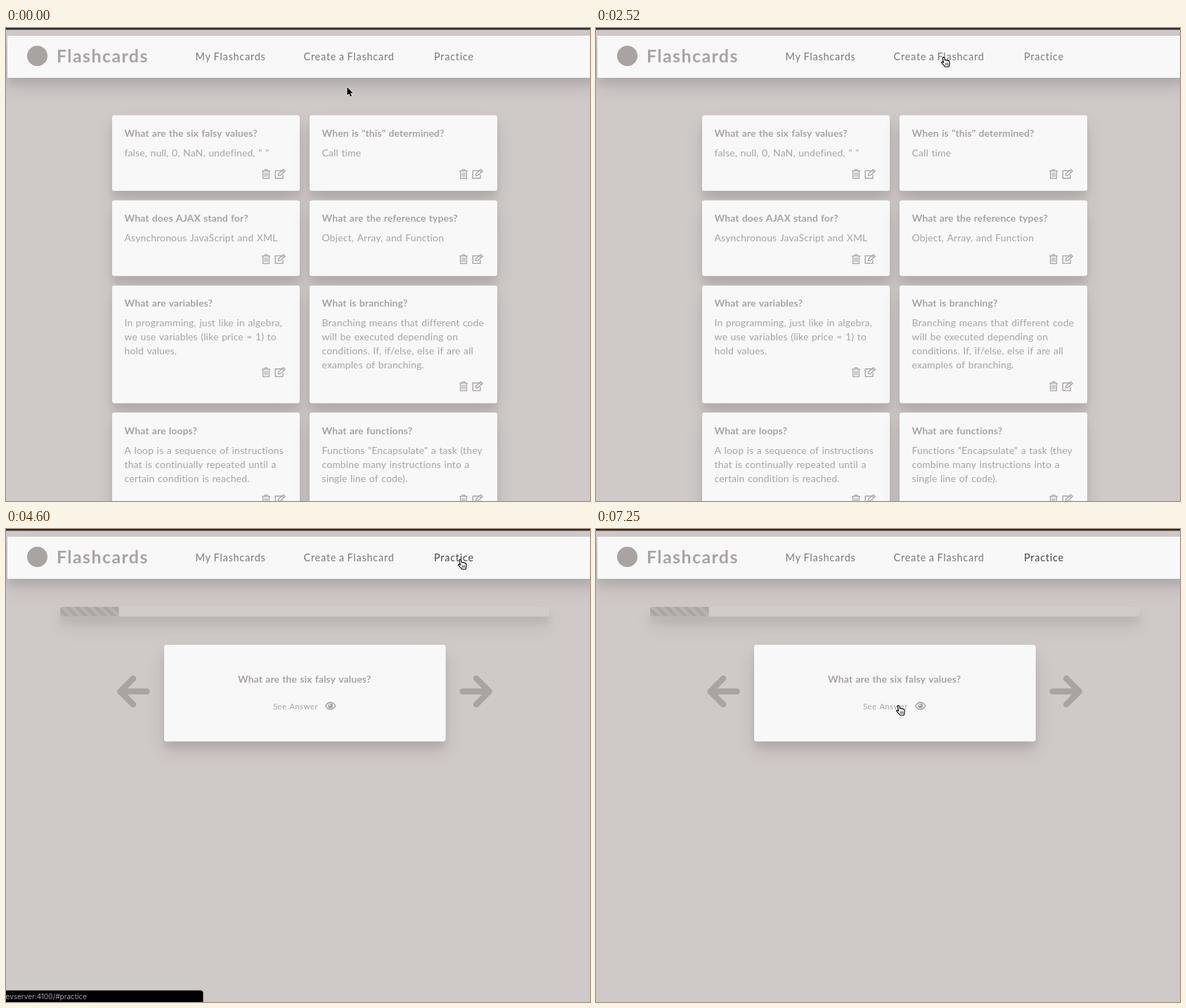
Animation, 831 px wide and 674 px high, one loop 8 s. Source, as an HTML page with a canvas:

```html
<!DOCTYPE html>
<html lang="en">
<head>
<meta charset="utf-8">
<title>Flashcards</title>
<style>
  html, body { margin: 0; width: 100%; height: 100%; overflow: hidden; background: #cfc9c8; }
  canvas { display: block; }
</style>
</head>
<body>
<canvas id="stage" width="831" height="674"></canvas>
<script>
const ctx = document.getElementById('stage').getContext('2d');
const LOOP = 8000;
const TICK = 148.2; // the screen refreshes once per tick
const INK = '#a9a3a2', PAPER = '#f8f8f8', PAGE = '#cfc9c8';

// Ticks at which the view changes
const HOVER = 20, STATUS = 24, PRACTICE = 31, FADE = 39;

// Pointer moves: start tick, end tick, destination
const HOME = [485, 84];
const MOVES = [
  [0, 2, 388, 88], [4, 5, 458, 88], [5, 11, 482, 41],
  [16, 17, 491, 41], [17, 19, 637, 64], [20, 22, 643, 43],
  [35, 39, 433, 180], [39, 43, 427, 244], [45, 49, 427, 251]
];

const DECK = [
  ['What are the six falsy values?', 'false, null, 0, NaN, undefined, " "'],
  ['When is "this" determined?', 'Call time'],
  ['What does AJAX stand for?', 'Asynchronous JavaScript and XML'],
  ['What are the reference types?', 'Object, Array, and Function'],
  ['What are variables?',
    'In programming, just like in algebra,\nwe use variables (like price = 1) to\nhold values.'],
  ['What is branching?',
    'Branching means that different code\nwill be executed depending on\n' +
    'conditions. If, if/else, else if are all\nexamples of branching.'],
  ['What are loops?',
    'A loop is a sequence of instructions\nthat is continually repeated until a\ncertain condition is reached.'],
  ['What are functions?',
    'Functions "Encapsulate" a task (they\ncombine many instructions into a\nsingle line of code).']
].map(([title, body]) => ({ title, lines: body.split('\n') }));

// Font, letter spacing, word spacing
const STYLES = {
  title: ['bold 14px Lato, sans-serif', 0.08, 0.7],
  body: ['14px Lato, sans-serif', 0.12, 0.8],
  nav: ['14.5px Lato, sans-serif', 0.75, -0.8],
  brand: ['bold 25px Lato, sans-serif', 1.4, 0],
  small: ['11.5px Lato, sans-serif', 0.35, 0.5],
  status: ['10px Inter, sans-serif', 0, 0]
};

const clamp = v => Math.min(1, Math.max(0, v));
const easeOut = q => q * (2 - q);

function text(str, x, y, style, color = INK) {
  const [font, letter, word] = STYLES[style];
  ctx.font = font;
  ctx.letterSpacing = letter + 'px';
  ctx.wordSpacing = word + 'px';
  ctx.fillStyle = color;
  ctx.fillText(str, x, y);
}

function box(x, y, w, h, r, color) {
  ctx.beginPath();
  ctx.roundRect(x, y, w, h, r);
  ctx.fillStyle = color;
  ctx.fill();
}

function disc(x, y, r, color) {
  ctx.beginPath();
  ctx.arc(x, y, r, 0, Math.PI * 2);
  ctx.fillStyle = color;
  ctx.fill();
}

function line(d, width, color = INK) {
  ctx.lineWidth = width;
  ctx.strokeStyle = color;
  ctx.lineCap = ctx.lineJoin = 'round';
  ctx.stroke(new Path2D(d));
}

function at(x, y, draw) {
  ctx.save();
  ctx.translate(x, y);
  draw();
  ctx.restore();
}

function castShadow(dy, blur, alpha) {
  ctx.shadowOffsetY = dy;
  ctx.shadowBlur = blur;
  ctx.shadowColor = `rgba(0,0,0,${alpha})`;
}

function raised(...rect) {
  ctx.save();
  castShadow(14, 28, 0.1);
  box(...rect);
  castShadow(10, 10, 0.07);
  box(...rect);
  ctx.restore();
}

function trash() {
  line('M-5.5-4.3H5.5M-2.3-4.5L-1.5-6.3H1.5L2.3-4.5M-4.4-4.2V6.4H4.4V-4.2', 1.3);
  line('M-2-1.7V4M0-1.7V4M2-1.7V4', 1);
}

function pencil() {
  line('M1.5-4.6H-6.8V6.2H4V1.8', 1.4);
  line('M-2.6 2.4L-2.2-.4L4.6-6.5L7.3-4L.4 2.1ZM2.7-5L5.3-2.4', 1.3);
}

function eye() {
  line('M-7.2 0Q-4-5 0-5T7.2 0Q4 5 0 5T-7.2 0Z', 1.4);
  disc(0, 0, 3.5, INK);
  disc(-1.1, -1.1, 1.1, PAPER);
}

function bigArrow() {
  line('M-19 0H19M-.5-18.5L-19 0L-.5 18.5', 8.6);
}

function header(tick) {
  const shade = 124 - 53 * clamp((tick - HOVER) / 2);
  ctx.fillStyle = PAGE;
  ctx.fillRect(0, 0, 831, 674);
  raised(2, 11, 840, 60, 0, PAPER);
  box(0, 0, 831, 2.5, 0, '#2f2b2c');
  disc(44.5, 39.7, 14.5, INK);
  text('Flashcards', 72, 48.5, 'brand');
  text('My Flashcards', 269.5, 45.5, 'nav', '#7c7979');
  text('Create a Flashcard', 423.5, 45.5, 'nav', '#7c7979');
  text('Practice', 609, 45.5, 'nav', `rgb(${shade},${shade - 3},${shade - 3})`);
}

function card({ title, lines }, x, y, h) {
  const iconY = y + 63.5 + lines.length * 20;
  raised(x, y, 267, h, 3.5, PAPER);
  text(title, x + 17.5, y + 30.5, 'title');
  lines.forEach((s, i) => text(s, x + 17.5, y + 58.5 + i * 20, 'body'));
  at(x + 219, iconY, trash);
  at(x + 239, iconY, pencil);
}

function cardList() {
  let y = 124.5;
  for (let i = 0; i < DECK.length; i += 2) {
    const row = DECK.slice(i, i + 2);
    const h = 87.5 + 20 * Math.max(...row.map(c => c.lines.length));
    row.forEach((c, col) => card(c, 151 + col * 281, y, h));
    y += h + 13.7;
  }
}

function progress() {
  const x = 77, y = 111, w = 83.5, h = 13.4;
  raised(x, y, 696, h, 3.5, '#d1cbca');
  ctx.save();
  box(x, y, w, h, [3.5, 0, 0, 3.5], '#aba5a4');
  ctx.clip();
  ctx.beginPath();
  for (let s = x - h * 0.75; s < x + w; s += h) {
    ctx.moveTo(s, y);
    ctx.lineTo(s + h, y + h);
  }
  ctx.lineWidth = h / Math.SQRT2 / 2;
  ctx.lineCap = 'square';
  ctx.strokeStyle = '#b8b2b1';
  ctx.stroke();
  ctx.restore();
}

function practice() {
  progress();
  raised(225, 165, 400.5, 137.5, 3.5, PAPER);
  text(DECK[0].title, 330, 218.5, 'title');
  text('See Answer', 380, 256.5, 'small');
  at(461.7, 252, eye);
  at(181.5, 231.5, bigArrow);
  at(668.7, 231.5, () => { ctx.scale(-1, 1); bigArrow(); });
}

function statusBar(alpha) {
  ctx.save();
  ctx.globalAlpha = alpha;
  box(-5, 657.5, 285.5, 20, 3.5, '#000');
  text('evserver:4100/#practice', -0.5, 670, 'status', '#a3a3a3');
  ctx.restore();
}

function arrowPointer() {
  const d = 'M.5.3V12L3.2 9.5L5 13.7L7 12.8L5.2 8.8H8.8Z';
  line(d, 1.5, '#fff');
  ctx.fillStyle = '#000';
  ctx.fill(new Path2D(d));
}

function handPointer() {
  const d = 'M3.6 8.3L2.3 2.2Q2 .7 3.3.6Q4.4.5 4.8 1.9L5.7 5Q7 4 7.8 5.2Q9 4.4 9.8 5.7Q11.4 5.2 11.8 6.8' +
    'Q12.6 9 11.9 11L11.2 14.3H5.5Q4.6 12.4 3 11.2L.8 8.7Q.3 7.5 1.4 7.2Q2.4 7 3.6 8.3Z';
  ctx.fillStyle = '#fff';
  ctx.fill(new Path2D(d));
  line(d, 1.1, '#000');
  line('M6.2 9V12M8 9V12M9.8 9V12', 0.7, '#000');
}

function pointer(tick) {
  let [x, y] = HOME;
  for (const [from, to, toX, toY] of MOVES) {
    const q = easeOut(clamp((tick - from) / (to - from)));
    x += (toX - x) * q;
    y += (toY - y) * q;
  }
  const overNav = y < 52;
  const overAnswer = tick >= PRACTICE && y > 242;
  at(Math.round(x), Math.round(y), overNav || overAnswer ? handPointer : arrowPointer);
}

function draw(tick) {
  header(tick);
  if (tick < PRACTICE) cardList();
  else practice();
  if (tick >= STATUS && tick <= FADE) statusBar(tick < FADE ? 1 : 0.42);
  pointer(tick);
}

let shown;
const start = performance.now();
function run() {
  const t = (performance.now() - start) % LOOP;
  const tick = Math.floor((t + 11) / TICK);
  if (tick !== shown) draw(shown = tick);
  requestAnimationFrame(run);
}
run();
</script>
</body>
</html>
```
